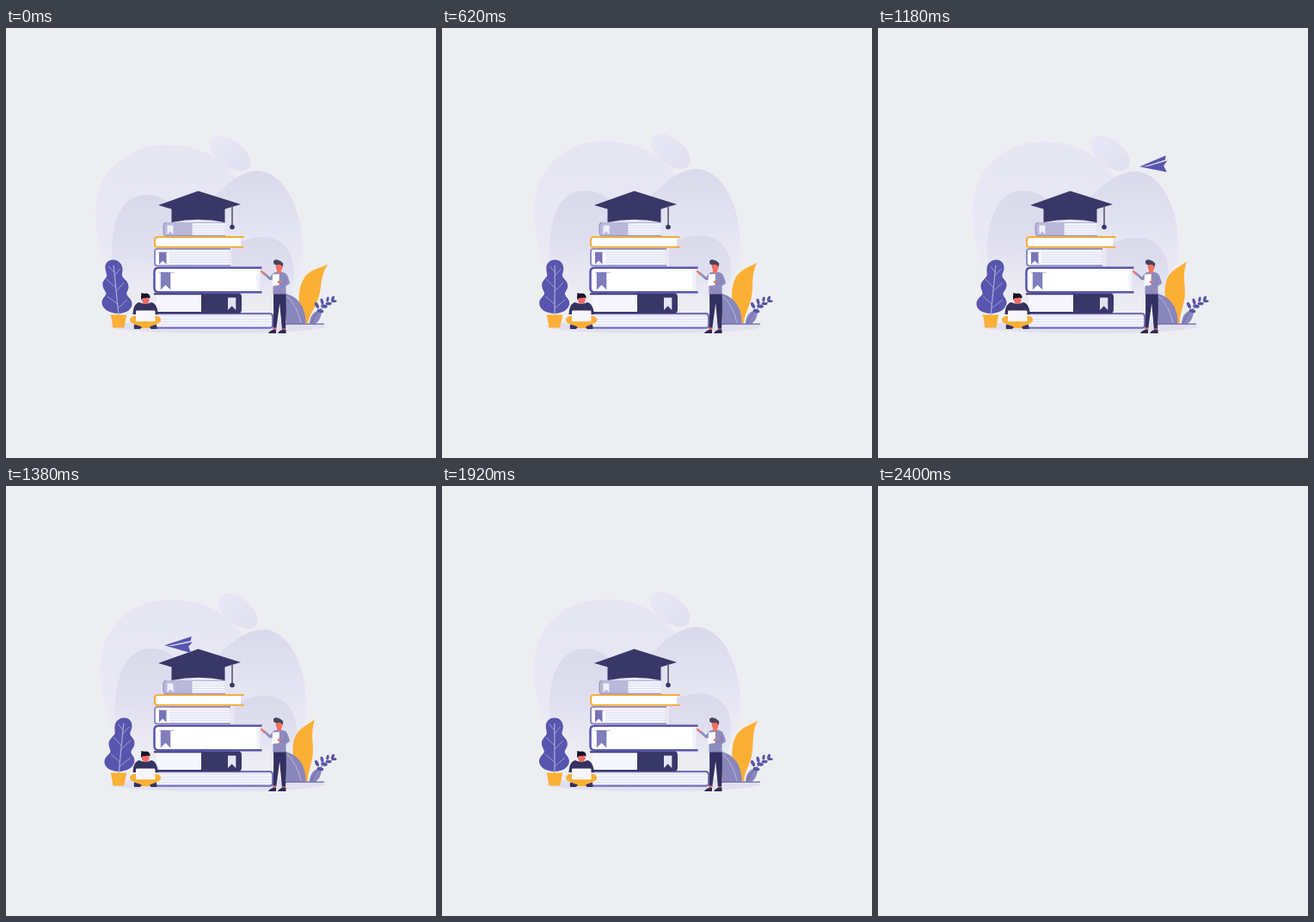
Write an HTML page that moves like this. It is 500 px wide and 500 px high and loops after 2420 ms.

```html
<!DOCTYPE html>
<html lang="en">
<head>
<meta charset="utf-8">
<title>Learning</title>
<style>
html, body { margin: 0; width: 100%; height: 100%; overflow: hidden; background: #edeef2; }
svg { display: block; width: 100vw; height: 100vh; }
</style>
</head>
<body>
<svg viewBox="0 0 500 500">
  <defs>
    <linearGradient id="pale" x1="0" y1="136" x2="0" y2="335" gradientUnits="userSpaceOnUse">
      <stop offset="0" stop-color="#e6e5f3"/><stop offset=".6" stop-color="#e9e8f5"/>
      <stop offset="1" stop-color="#edeef2" stop-opacity="0"/>
    </linearGradient>
    <linearGradient id="hill" x1="0" y1="166" x2="0" y2="325" gradientUnits="userSpaceOnUse">
      <stop offset="0" stop-color="#dad9ec"/><stop offset=".58" stop-color="#e8e7f4"/>
      <stop offset="1" stop-color="#edeef2" stop-opacity="0"/>
    </linearGradient>
    <linearGradient id="low" x1="0" y1="0" x2="0" y2="1">
      <stop offset="0" stop-color="#dad9eb"/><stop offset=".45" stop-color="#e0dff0"/>
      <stop offset="1" stop-color="#ebebf5" stop-opacity="0"/>
    </linearGradient>
    <linearGradient id="drop" x1="0" y1="0" x2="1" y2="0">
      <stop offset="0" stop-color="#e8e7f5"/><stop offset="1" stop-color="#e1e0f0"/>
    </linearGradient>
  </defs>
  <g id="scene">
    <g id="cloud">
      <path fill="url(#pale)" d="M104 215C104 172 136 136 187 136C225 136 254 152 270 178C300 160 346 215 346 262C344 290 333 312 322 338H142C127 316 104 258 104 215Z"/>
      <path fill="url(#hill)" d="M228 210C252 186 270 166 293 166C326 168 345 215 345 255C342 282 335 305 325 328H210Z"/>
      <path fill="url(#low)" d="M129 308C118 270 118 194 163 194C195 194 200 220 222 242V335H140Z"/>
      <path fill="url(#low)" d="M262 254C275 246 288 243 300 243C324 244 336 264 335 288C334 305 329 320 324 335H262Z"/>
      <ellipse cx="261" cy="146" rx="27" ry="15" transform="rotate(37 261 146)" fill="url(#drop)"/>
    </g>
    <ellipse cx="246" cy="347" rx="125" ry="8" fill="#e1e0f0"/>

    <g id="bush">
      <path fill="#5755ad" d="M131 269.500C137 269.500 141 274 141 280C141 284 139 286 140 289C142 293 146 294 146 300C146 305 142 307 143 310C144 313 148 315 148 320C148 327 140 332 131 332C121 332 113 327 113 320C113 315 118 312 119 309C119 306 116 304 116 299C116 294 120 292 122 288C122 285 121 283 121 279C121 274 125 269.500 131 269.500Z"/>
      <path fill="none" stroke="#a7a5d7" stroke-width=".9" d="M131 284L125 277M131 288L138 280M131 302L121 292M131 306L141 296M131 321L120 312M131 326L143 316"/>
      <path fill="none" stroke="#a7a5d7" stroke-width="1.300" d="M131 335V276"/>
    </g>
    <path fill="#fbaf35" d="M121.500 333.500H140.300L139.500 337L137.300 348.500H124.500L122.500 337Z"/>

    <g id="leaf">
      <path fill="#fbaf35" d="M348 343C339 325 338 306 346 292C352 281 363 280 374 275C365 290 367 301 364 311C361 324 354 330 351 343Z"/>
    </g>
    <path fill="#8886bb" d="M325 309C340 312 349 326 348.500 344H326Z"/>
    <path fill="none" stroke="#c5c4e2" stroke-width=".8" d="M327 312Q339 324 343 343"/>
    <path fill="#8886bb" d="M353 344C353 335 358 328 367 328C367 336 364 341 360 344Z"/>
    <path fill="none" stroke="#5f5dab" stroke-width=".8" d="M355 343Q361 325 383 317"/>
    <g id="sprig" fill="#5856a6"></g>
    <path stroke="#7c7ab4" stroke-width="1.500" d="M322 344.200H370"/>

    <g id="books"></g>

    <g fill="#393768">
      <path d="M177 206L223.500 189.500L273 205L254.500 210.500V226Q223.500 219.500 192.500 226V210.500Z"/>
      <path fill="none" stroke="#68667f" stroke-width="1.800" d="M263 207V230"/>
      <circle cx="263" cy="231.500" r="2.800"/>
    </g>

    <g id="reader">
      <path fill="#353360" d="M155 319Q162 322 169 319C174 320 176 325 177 333H147.500C148 325 150 320 155 319Z"/>
      <circle cx="162.300" cy="316.500" r="4.300" fill="#f16a62"/>
      <path fill="#151329" d="M157 315L157.300 308Q160 309 163 308.500Q168 309 167.500 314.500Q165 313 162 314Q159 313 157.500 316Z"/>
      <path fill="#fbaf35" d="M151 334.500C146 335 143 337.500 144.500 341C147 345 155 345 158 349H167C171 344 178 345 180 340.500C181 337 178 335 173 334.500Z"/>
      <path fill="#353360" d="M149.500 344.500L158 347.500L156 350H149Q148 347 149.500 344.500ZM174.500 344.500L167 347.500L168.500 350H175.500Q176 347 174.500 344.500Z"/>
      <rect x="151" y="328.500" width="22.500" height="12.700" rx="1.200" fill="#f7f6fc"/>
    </g>

    <g id="guide">
      <path fill="#323060" d="M311 308H325.500Q326.500 330 325 351H321L318.200 320L314.200 350H310.500Q311.500 330 311 308Z"/>
      <path fill="#f2705d" d="M310.700 348.500H314V351.500H310.700ZM321 349.500H324.700V351.500H321Z"/>
      <path fill="#2c2a50" d="M310.500 350.800H314V355H304.800Q306 352.500 310.500 350.800ZM321 350.800H325.500V355H316Q317 352.500 321 350.800Z"/>
      <path fill="#8d8cbd" d="M311.500 284.500Q318 282.500 325 285C328 288 329 293 330 297L325.500 300V309.500H310.500V293L306.500 293L299 286L300.500 284L307 289.500Z"/>
      <path fill="none" stroke="#7a79b0" stroke-width=".7" d="M324 289L325.500 296L318 298"/>
      <path fill="#f2705d" d="M301 285.500L299.400 287L296 283.500L296.500 281.800L298.500 282.500ZM315 280H320V284.500Q317 286 315 284Z"/>
      <path fill="#f2705d" d="M313.800 274H321.300V279.500Q320.500 282.500 317.500 282.500Q314 281.500 313.800 278Z"/>
      <path fill="#46445f" d="M311 271Q312.500 268.500 315.500 269.500Q319 270 322.200 273.500L322 278Q320.500 275.500 318 275L314 275.500Q310.500 275 311 271Z"/>
      <path fill="#fbfbff" d="M310 286.500L317.800 286L317.500 299L309.200 300Z"/>
      <ellipse cx="317.600" cy="295.300" rx="2" ry="1.400" fill="#f2705d"/>
    </g>
  </g>
  <g id="plane">
    <path fill="#5856ad" d="M0 0L30 -14.500L29.500 -9.500L8 -1.200ZM0 0L9 -.6L32 -8.500L28 -2.500L32 4.700Z"/>
    <path stroke="#c8c7e8" stroke-width=".6" d="M7 -1L30 -8.600"/>
  </g>
</svg>
<script>
const LOOP = 2420, END = 2400;
const el = id => document.getElementById(id);
const rect = (x, y, w, h, fill) => `<rect x="${x}" y="${y}" width="${w}" height="${h}" fill="${fill}"/>`;
const line = (d, color, width) =>
  `<path d="${d}" fill="none" stroke="${color}" stroke-width="${width}" stroke-linejoin="round"/>`;

function ruled(x, y, w, h, n) {
  let out = rect(x, y, w, h, '#f4f4fc');
  for (let i = 1; i <= n; i++) out += rect(x, y + i * h / (n + 1) - .4, w, .8, '#d9dcf0');
  return out;
}

// cover open at the right, rounded at the spine
function cover(x, y, w, h, r, color, width) {
  return line(`M${x + w} ${y}H${x + r}Q${x} ${y} ${x} ${y + r}V${y + h - r}Q${x} ${y + h} ${x + r} ${y + h}H${x + w}`, color, width);
}

function ribbon(x, y, w, h, color) {
  return `<path fill="${color}" d="M${x} ${y}h${w}v${h}l${-w / 2} ${-w / 2}l${-w / 2} ${w / 2}z"/>`;
}

el('books').innerHTML =
  // bottom
  ruled(170, 332, 139, 16, 4) +
  line('M170 332.2H306.500Q310.200 332.200 310.200 336V345Q310.200 348.700 306.500 348.700H170', '#7371b6', 2.200) +
  // dark
  rect(175, 310, 54, 20, '#f5f5fc') +
  line('M172 309.300H230M172 331H230', '#393768', 2) +
  '<path fill="#393768" d="M227 308.300H270Q274 308.300 274 313V327Q274 332 270 332H227Z"/>' +
  ribbon(258, 313.500, 9.300, 14.500, '#e4e4f6') +
  // large
  rect(173, 279, 120, 28, '#fff') + rect(291.500, 280, 4, 26, '#f1f1fb') +
  cover(172.500, 278.700, 125, 28.500, 5, '#5856ad', 2.500) +
  rect(178, 283.700, 18, 1.300, '#c9c8e4') + ribbon(179.800, 284, 11.500, 20.500, '#807ebc') +
  // ruled
  rect(174, 257, 17, 19, '#fbfbff') + ruled(190, 258, 69, 17.500, 5) +
  cover(173, 256.900, 88, 19.500, 3, '#8c8bbe', 1.900) +
  rect(177, 260.300, 12, .9, '#c9c8e4') + ribbon(178, 260.700, 8.500, 14, '#7775b7') +
  // amber
  rect(174, 243, 99, 12, '#fff') + cover(173, 243, 103.500, 11.800, 3.500, '#f9a938', 2) +
  // top
  ruled(216, 227, 38.500, 14, 4) +
  '<path fill="#b9b8da" d="M186 226H216.500V242H186Q182.500 242 182.500 238V230Q182.500 226 186 226Z"/>' +
  line('M186 226.500Q183.300 226.500 183.300 230V238Q183.300 241.500 186 241.500H255', '#9c9bc6', 1.300) +
  line('M216 226.500H255', '#b0afd3', 1) +
  ribbon(187.500, 229.500, 7, 10.500, '#f0f0fb');

const leaflet = (x, y, a, s = 1) =>
  `<ellipse cx="${x}" cy="${y}" rx="${3.900 * s}" ry="${2 * s}" transform="rotate(${a} ${x} ${y})"/>`;
el('sprig').innerHTML =
  leaflet(361.500, 322.500, 65) + leaflet(367.500, 318, 75, .9) + leaflet(374, 315.500, 100, .8) +
  leaflet(380, 314.500, 115, .8) + leaflet(365.500, 329, 15) + leaflet(370, 323.500, 10) +
  leaflet(375, 320.500, 5, .9) + leaflet(381.500, 317.500, 0, .8);

// 0 at the start, 1 at the turn, part triangle and part cosine
function sway(t) {
  const u = t / 2500;
  const tri = 1 - Math.abs(1 - 2 * u);
  const wave = (1 - Math.cos(2 * Math.PI * u)) / 2;
  return Math.min(1, (tri + wave) * .53);
}

function draw(t) {
  const on = t < END, r = sway(t);
  el('scene').style.display = on ? '' : 'none';
  const bob = -2.300 * r - 9.400 * r * (1 - r);
  el('cloud').setAttribute('transform', `translate(0 ${bob}) rotate(${2.500 * r} 225 350)`);
  el('bush').setAttribute('transform', `matrix(1 0 ${-.2 * (r - .5)} 1 ${67 * (r - .5)} 0)`);
  el('leaf').setAttribute('transform', `rotate(${-12.300 * r} 350 343)`);

  const u = (t - 960) / 680;
  const flying = u >= 0 && u < 1;
  el('plane').style.display = flying ? '' : 'none';
  if (flying) {
    const p = (1 - Math.cos(Math.PI * u)) / 2, d = 270 * p;
    el('plane').setAttribute('transform',
      `translate(${368.500 - d} ${146 + .25 * d - .0002 * d * d}) rotate(${11.600 * p})`);
  }
}

const start = performance.now();
function tick() {
  draw((performance.now() - start) % LOOP);
  requestAnimationFrame(tick);
}
tick();
</script>
</body>
</html>
```
